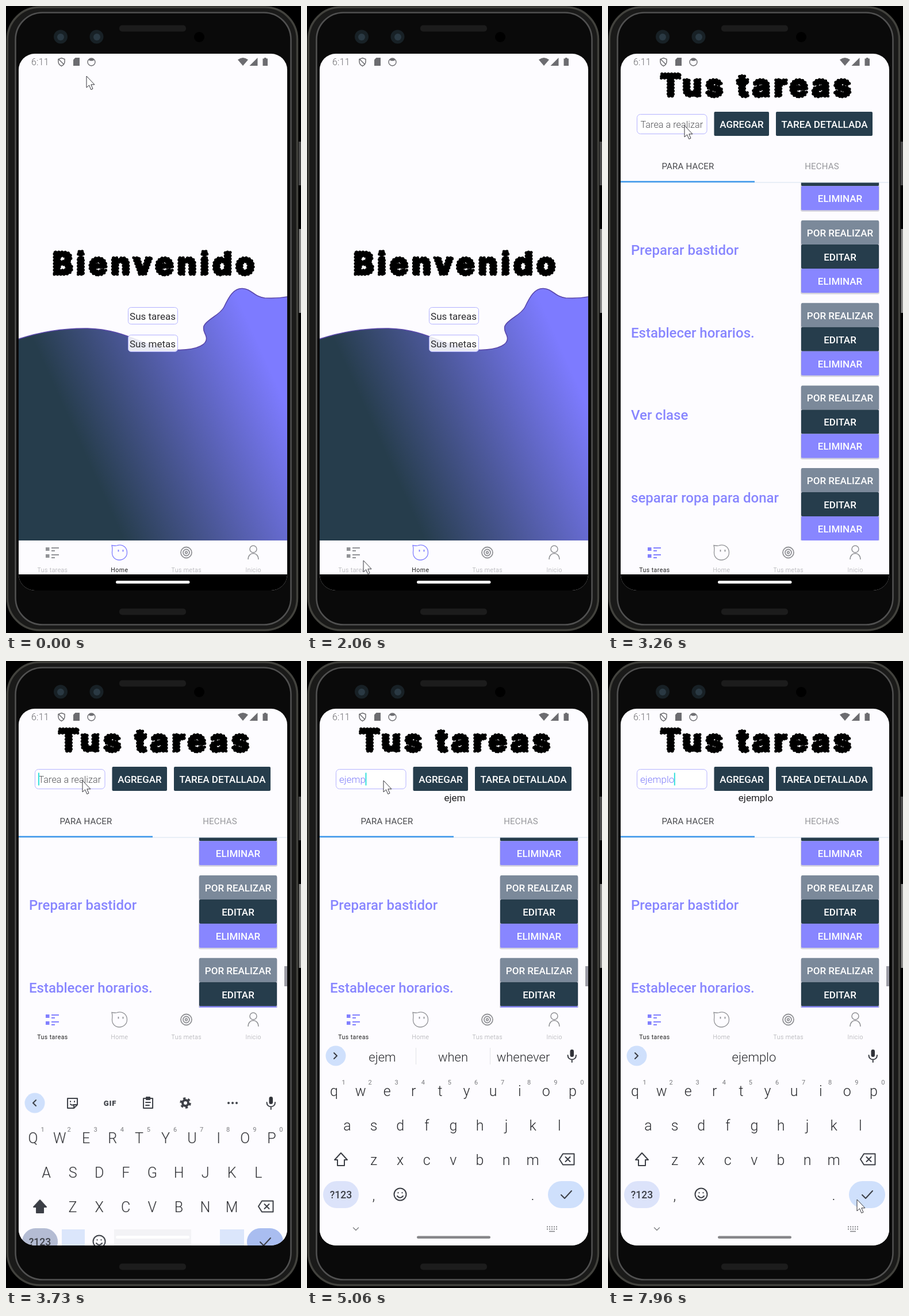
An HTML page that plays this animation: 513x1091 px, repeating every 8 s.

```html
<!DOCTYPE html>
<html lang="es">
<head>
<meta charset="utf-8">
<title>Tus tareas</title>
<style>
html, body { margin: 0; width: 100%; height: 100%; overflow: hidden; background: #000; }
svg { display: block; font-family: Roboto, "Open Sans", sans-serif; }
.mid { text-anchor: middle; }
.title { font: 800 53px Inter, "Open Sans", sans-serif; letter-spacing: 6.4px; stroke: #000; stroke-linecap: round; stroke-linejoin: round; }
.solid { stroke-width: 2.4px; }
.bumps { stroke-width: 5px; stroke-dasharray: 0 5.6; }
.btn { font-size: 17px; font-weight: 500; fill: #fff; text-anchor: middle; }
.task { font-size: 24px; font-weight: 500; fill: #8886ff; }
.nav { font-size: 10.5px; letter-spacing: .45px; font-weight: 300; text-anchor: middle; }
.key { font-size: 25px; font-weight: 300; fill: #2b2c30; text-anchor: middle; }
.digit { font-size: 11px; fill: #77787c; text-anchor: middle; }
.hint { font-size: 22px; font-weight: 300; fill: #2b2c30; text-anchor: middle; }
.line { fill: none; stroke: #3c3f46; stroke-width: 2px; stroke-linecap: round; stroke-linejoin: round; }
</style>
</head>
<body>
<svg width="513" height="1091" viewBox="0 0 513 1091">
  <defs>
    <linearGradient id="hill" gradientUnits="userSpaceOnUse" x1="100" y1="698" x2="423" y2="552">
      <stop offset="0" stop-color="#263d4c"/><stop offset="1" stop-color="#7d7bff"/>
    </linearGradient>
    <clipPath id="screen"><rect x="22" y="83" width="467" height="934" rx="28"/></clipPath>
    <clipPath id="listBox"><rect x="22" y="307" width="467" height="623"/></clipPath>
  </defs>

  <!-- phone body -->
  <g>
    <path d="M509 236h4v76h-4z" fill="#4a4a49"/>
    <path d="M509.500 388h3.500v146h-3.500z" fill="#8a8a88"/>
    <rect x="2.500" y="2" width="504" height="1084" rx="56" fill="#1a1a19" stroke="#42423d" stroke-width="3.500"/>
    <rect x="16.500" y="11.500" width="479" height="1065" rx="47" fill="#0a0a0a" stroke="#505050" stroke-width="2.600"/>
    <g fill="#1c1c1c">
      <rect x="197" y="33.500" width="116" height="11" rx="5"/>
      <rect x="197" y="1048.500" width="116" height="11" rx="5"/>
    </g>
    <g fill="#182126"><circle cx="95" cy="53.500" r="12"/><circle cx="157.500" cy="53.500" r="12"/></g>
    <g fill="#2a3943"><circle cx="95" cy="54" r="6"/><circle cx="158" cy="54" r="6"/></g>
    <circle cx="336" cy="54" r="9" fill="#000"/>
  </g>

  <g clip-path="url(#screen)">
    <rect x="22" y="83" width="467" height="934" fill="#fdfcff"/>

    <g id="home">
      <path d="M20 580C62 566 103 560.500 142 561C215 563 243 598.500 302 598.500C333 598 352 589 348 575C346 568 342 566 344 557C349 545 372 538 379 524C388 505 396 491 411 491.500C427 492 431 506 450 508C464 509 476 508.500 492 505.500V932H20Z" fill="url(#hill)" stroke="#5a48ab" stroke-width="1.600"/>
      <text class="title solid" x="81" y="467">Bienvenido</text>
      <text class="title bumps" x="81" y="467" aria-hidden="true">Bienvenido</text>
      <g fill="#fff" fill-opacity=".87" stroke="#b1b0ff">
        <rect x="212.500" y="524.500" width="86" height="29" rx="5"/>
        <rect x="212.500" y="572.500" width="86" height="29" rx="5"/>
      </g>
      <g class="mid" font-size="17" fill="#2d2d30">
        <text x="255" y="545.500">Sus tareas</text><text x="255" y="593.500">Sus metas</text>
      </g>
      <g id="homeNav"></g>
    </g>

    <g id="tasks">
      <text class="title solid" x="91" y="157">Tus tareas</text>
      <text class="title bumps" x="91" y="157" aria-hidden="true">Tus tareas</text>
      <rect x="50.500" y="188.500" width="121.500" height="34" rx="6" fill="#fff" stroke="#b5b3ff"/>
      <text id="empty" x="56.500" y="212" font-size="16.300" font-weight="300" fill="#55565a">Tarea a realizar</text>
      <g id="typed" font-size="17" font-weight="300" fill="#7f7dfa"></g>
      <g id="caret"></g>
      <g fill="#263d4c"><rect x="184.500" y="184" width="95.500" height="42" rx="2"/><rect x="292" y="184" width="168" height="42" rx="2"/></g>
      <g class="btn"><text x="232.500" y="212">AGREGAR</text><text x="376.500" y="212">TAREA DETALLADA</text></g>
      <g id="echo" class="mid" font-size="17" fill="#1e1e20"></g>
      <g class="mid" font-size="15" letter-spacing=".2">
        <text x="139" y="284" fill="#47484c">PARA HACER</text>
        <text x="372" y="284" fill="#96979b">HECHAS</text>
      </g>
      <g clip-path="url(#listBox)"><g id="rows"></g></g>
      <path d="M22 307H489" stroke="#d5e2ee"/>
      <rect x="22" y="304.500" width="233" height="2.500" fill="#3d97ea"/>
      <rect id="thumb" x="484" y="780" width="5" height="150" fill="#a9a9b2"/>
      <g id="taskNav"></g>
    </g>

    <g id="bar">
      <rect x="22" y="989" width="467" height="28" fill="#000"/>
      <rect x="191" y="1000" width="128.500" height="5" rx="2.500" fill="#fff"/>
    </g>

    <g id="panel">
      <rect x="22" y="603" width="467" height="414" fill="#fdfcff"/>
      <rect x="484" y="531" width="5" height="35" fill="#9c9ca6"/>
      <g id="raisedNav"></g>
      <g id="strip">
        <path d="M97 989H137V1017H97ZM372 989H414V1017H372Z" fill="#dbe6fb"/>
        <rect x="188" y="989" width="134" height="28" fill="#f3f3f6"/>
        <rect x="191" y="1000" width="128" height="5" rx="2.500" fill="#fff"/>
      </g>
      <g id="board">
        <circle cx="50" cy="687" r="17.500" fill="#cfe0fc"/>
        <g fill="#303238">
          <rect x="457.500" y="676" width="6.500" height="13" rx="3.250"/>
          <path class="line" d="M453.500 686C453.500 696 468 696 468 686M460.750 693.500V698"/>
        </g>
        <g id="tools">
          <path class="line" d="M52 682L47 687L52 692"/>
          <path class="line" d="M107 679H124V690L118 696H107ZM118 696V690H124M112 684V685M119 684V685M112 689Q115 692 117 690"/>
          <text class="mid" x="181" y="691.500" font-size="13" font-weight="900" letter-spacing=".8" fill="#3c3f46">GIF</text>
          <path class="line" d="M239 679H255V696H239ZM244 677H250V681H244ZM243 686H251M243 691H249"/>
          <circle cx="312" cy="687" r="5" fill="none" stroke="#3c3f46" stroke-width="4"/>
          <circle cx="312" cy="687" r="8" fill="none" stroke="#3c3f46" stroke-width="3.500" stroke-dasharray="4.200 4.180"/>
          <g fill="#3c3f46"><circle cx="387" cy="687" r="2"/><circle cx="394" cy="687" r="2"/><circle cx="401" cy="687" r="2"/></g>
        </g>
        <path id="open" class="line" d="M47 682L52 687L47 692"/>
        <g id="hints"></g>
        <g id="digits"></g>
        <g id="upper"></g>
        <g id="lower"></g>
        <path class="line" d="M439 867L445 857.500H464.500V876.500H445ZM449.500 863L457.500 871M457.500 863L449.500 871"/>
        <rect x="28" y="905" width="62" height="47" rx="23.500" fill="#dce3fa"/>
        <rect x="419" y="905" width="63" height="47" rx="23.500" fill="#cfe0fc"/>
        <g id="shade">
          <rect x="28" y="905" width="62" height="47" rx="23.500" fill="#b4bcd3"/>
          <rect x="419" y="905" width="63" height="47" rx="23.500" fill="#a9bdf0"/>
        </g>
        <text class="mid" x="59" y="935" font-size="17.500" font-weight="500" fill="#3c3f46">?123</text>
        <text class="key" x="116" y="938">,</text>
        <text class="key" x="392.500" y="938">.</text>
        <circle class="line" cx="162" cy="928" r="10.500"/>
        <path class="line" d="M157 931Q162 937 167 931M158.500 925V925.500M165.500 925V925.500"/>
        <path class="line" d="M442 929L448 935L460 922"/>
        <path class="line" d="M80.500 986L85 990.500L89.500 986" style="stroke:#85868a;stroke-width:1.5px"/>
        <path d="M417 984.500H435M417 988.500H435" stroke="#85868a" stroke-width="2" stroke-dasharray="2 2"/>
        <path d="M421 992.500H431" stroke="#85868a" stroke-width="1.600"/>
        <rect x="191" y="1000.500" width="128" height="4.500" rx="2.250" fill="#87878a"/>
      </g>
    </g>

    <!-- status bar -->
    <g fill="#6c6c70">
      <text x="44" y="103" font-size="16" font-weight="300" letter-spacing=".2">6:11</text>
      <path d="M96.500 90.500L102 92.500V97C102 101 99.500 103 96.500 104.500C93.500 103 91 101 91 97V92.500ZM92 93L101 102" fill="none" stroke="#6c6c70" stroke-width="1.500"/>
      <path d="M120.500 90H128V104H117V93.500Z"/>
      <circle cx="148.500" cy="97.500" r="6.500" fill="none" stroke="#6c6c70" stroke-width="1.400"/>
      <path d="M143.500 94A6.500 6.500 0 0 1 153.500 94Q148.500 97 143.500 94Z"/>
      <path d="M403 93.500Q412 86.500 421 93.500L412 104Z"/>
      <path d="M437.500 90V104H423.500Z"/>
      <path d="M449 90H452.500V91.500H455V104H446.500V91.500H449Z"/>
    </g>
  </g>

  <path id="cursor" d="M0 0V20L4.600 15.800L7.800 23.500L11 22.100L7.800 14.800H14Z" fill="#fff" stroke="#33333a" stroke-linejoin="round"/>
</svg>

<script>
const LOOP = 8000, PAGE = 2460, RAISE = 3590, TYPE = 4360;
const $ = id => document.getElementById(id);
let rules = '', count = 0;

function animate(el, frames) {
  const name = 'k' + count++;
  const body = frames.map(([ms, css]) => `${ms * 100 / LOOP}%{${css}}`).join('');
  rules += `@keyframes ${name}{${body}}`;
  el.style.animation = `${name} ${LOOP}ms infinite`;
}

// times alternate between appearing and vanishing
function show(el, ...times) {
  const step = (ms, on) => [ms, `opacity:${on};animation-timing-function:step-end`];
  const frames = times.map((ms, i) => step(ms, i % 2 ? 0 : 1));
  if (times[0] > 0) frames.unshift(step(0, 0));
  animate(el, [...frames, step(LOOP, times.length % 2)]);
}

function add(parent, markup) {
  parent.insertAdjacentHTML('beforeend', markup);
  return parent.lastElementChild;
}

function nav(id, active, dy) {
  const ink = i => i === active ? '#8280ff' : '#929397';
  const names = ['Tus tareas', 'Home', 'Tus metas', 'Inicio'];
  const labels = names.map((s, i) =>
    `<text class="nav" x="${81 + 116.4 * i}" y="984.5" fill="${i === active ? '#222' : '#a3a3a7'}" ${i === active ? 'style="font-weight:400"' : ''}>${s}</text>`).join('');
  add($(id), `<g transform="translate(0 ${dy})">
    <rect x="22" y="930" width="467" height="59" fill="#fdfcff"/>
    <path d="M69 942h6.500v6h-6.500zM69 954h6.500v6h-6.500z" fill="${ink(0)}"/>
    <path d="M79 943H92M79 948H85M79 955H92M79 960H85" stroke="${ink(0)}" stroke-width="1.8"/>
    <g fill="none" stroke="${ink(1)}" stroke-width="1.3">
      <path d="M184 938.500Q191 940 194 938.500C204 936 210.500 943 210.500 951C210.500 959 204 964 197 964C190 964 184.500 959 184.500 951C184.500 947 186 945 184 938.500Z"/>
      <path d="M195.500 946V949.500M203.500 946V949.500" stroke-width="1.8"/>
    </g>
    <g fill="none" stroke="${ink(2)}" stroke-width="1.8">
      <circle cx="313.500" cy="951" r="9.500"/><circle cx="313.500" cy="951" r="5.500"/><circle cx="313.500" cy="951" r="1.800"/>
    </g>
    <g fill="none" stroke="${ink(3)}" stroke-width="1.500">
      <circle cx="430" cy="945" r="6"/><path d="M421 963C421 949 439 949 439 963"/>
    </g>${labels}</g>`);
}
nav('homeNav', 1, 0);
nav('taskNav', 0, 0);
nav('raisedNav', 0, -327);

['', 'Preparar bastidor', 'Establecer horarios.', 'Ver clase', 'separar ropa para donar'].forEach((name, i) => {
  const top = 373 + 143.7 * (i - 1);
  const actions = [['POR REALIZAR', '#7b899a'], ['EDITAR', '#263d4c'], ['ELIMINAR', '#8886ff']];
  const buttons = actions.map(([s, fill], j) => {
    const y = top + 42 * j;
    return `<rect x="336" y="${y}" width="135" height="42" rx="2" fill="${fill}"/>
      <text class="btn" x="403.5" y="${y + 28}">${s}</text>`;
  }).join('');
  add($('rows'), `<g><rect x="335" y="${top + 1}" width="137" height="127.5" rx="3" fill="#30304a" opacity=".2"/>
    ${buttons}<text class="task" x="40" y="${top + 60}">${name}</text></g>`);
});

// keyboard letters
[['qwertyuiop', 47], ['asdfghjkl', 70], ['zxcvbnm', 116]].forEach(([keys, left], row) =>
  [...keys].forEach((k, i) => {
    const x = left + 46.1 * i, y = 757 + 60 * row;
    const key = s => `<text class="key" x="${x}" y="${y}">${s}</text>`;
    add($('lower'), key(k));
    add($('upper'), key(k.toUpperCase()));
    if (!row) add($('digits'), `<text class="digit" x="${x + 16.5}" y="737">${(i + 1) % 10}</text>`);
  }));
const arrow = fill => `<path class="line" style="fill:${fill}" d="M59 856L70 868H65V878H53V868H48Z"/>`;
add($('upper'), arrow('#3c3f46'));
add($('lower'), arrow('none'));

// typing: the echo below the field and the suggestions lag behind
const word = 'ejemplo';
const strokes = [TYPE, 4520, 4700, 4860, 5030, 5200, 5440];
const span = (i, lag) => i < 6 ? [strokes[i] + lag, strokes[i + 1] + lag] : [strokes[i] + lag];
const caretAt = x => add($('caret'), `<rect x="${x}" y="194.5" width="2" height="22" fill="#35e0dc"/>`);
strokes.forEach((_, i) => {
  const s = word.slice(0, i + 1);
  const text = add($('typed'), `<text x="56" y="212">${s}</text>`);
  show(text, ...span(i, 0));
  show(add($('echo'), `<text x="257" y="244">${s}</text>`), ...span(i, 150));
  const hint = (x, t) => `<text class="hint" x="${x}" y="697">${t}</text>`;
  const hints = s === 'ejem'
    ? hint(131, s) + hint(254, 'when') + hint(376, 'whenever') + '<path d="M189.500 673V702M318.500 673V702" stroke="#e3e3e8"/>'
    : hint(254, s);
  show(add($('hints'), `<g>${hints}</g>`), ...span(i, 90));
  const caret = caretAt(55.5 + text.getComputedTextLength());
  if (i < 6) show(caret, ...span(i, 0));
  else show(caret, 5440, 5940, 6440, 6940, 7440);
});
show(caretAt(56), 3540, 4040);

show($('home'), 0, PAGE);
show($('tasks'), PAGE);
show($('empty'), PAGE, TYPE);
show($('bar'), 0, RAISE);
show($('panel'), RAISE);
show($('strip'), RAISE, 3800);
show($('shade'), RAISE, 3800);
show($('upper'), RAISE, TYPE);
show($('tools'), RAISE, TYPE);
show($('lower'), TYPE);
show($('open'), TYPE);
animate($('thumb'), [[0, 'opacity:1'], [2900, 'opacity:1'], [3200, 'opacity:0'], [LOOP, 'opacity:0']]);

const move = (ms, x, y, ease = 'ease-in-out') =>
  [ms, `transform:translate(${x}px,${y}px);animation-timing-function:${ease}`];
animate($('board'), [
  move(0, 0, 340), move(RAISE, 0, 340, 'linear'), move(3730, 0, 83, 'ease-out'),
  move(3880, 0, 0), move(LOOP, 0, 0)
]);
animate($('cursor'), [
  move(0, 140, 122), move(30, 140, 122, 'ease-in'), move(420, 125, 500, 'linear'), move(830, 150, 1100),
  move(1500, 260, 1100), move(2230, 78, 948), move(2440, 78, 948, 'linear'),
  move(2520, 236, 556), move(2700, 236, 556), move(3250, 133, 208),
  move(6090, 133, 208, 'ease-in'), move(6350, 172, 231, 'ease-out'), move(6650, 215, 204),
  move(6930, 215, 204), move(7560, 428, 1008), move(7750, 433, 974, 'ease-out'),
  move(7950, 433, 937), move(LOOP, 433, 937)
]);

document.head.appendChild(document.createElement('style')).textContent = rules;
</script>
</body>
</html>
```
